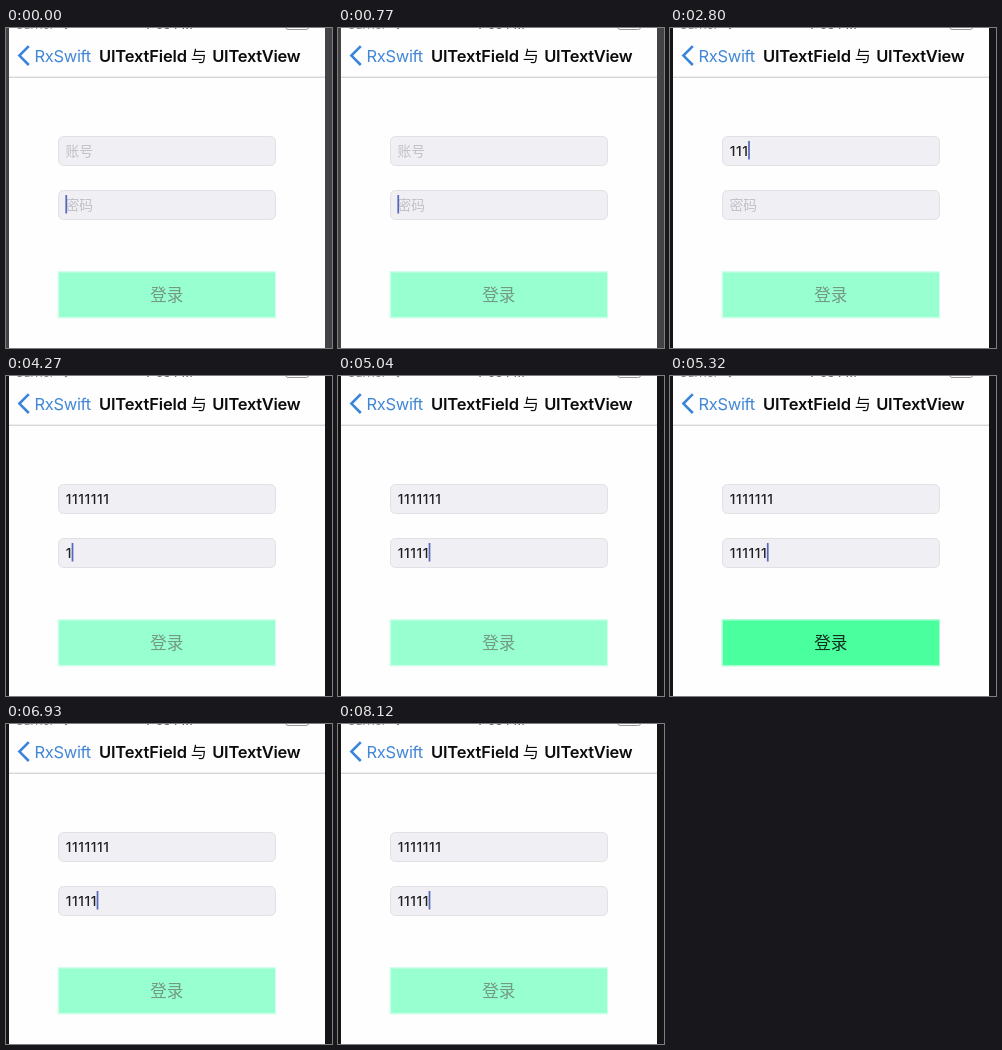
These frames come from a looping animation (326x320 px, 8470 ms). An HTML page with a canvas:

```html
<!DOCTYPE html>
<html lang="zh">
<head>
<meta charset="utf-8">
<title>登录</title>
<style>
  html, body { margin: 0; width: 100%; height: 100%; overflow: hidden; background: #fff; }
  canvas { display: block; width: 326px; height: 320px; }
</style>
</head>
<body>
<canvas id="stage" width="326" height="320"></canvas>
<script>
const ctx = document.getElementById('stage').getContext('2d');
const LOOP = 8470, TICK = 70;
const FONT = 'Inter, "Noto Sans CJK SC", "Noto Sans CJK", sans-serif';
const DIGIT = 6.25, TEXT_X = 59.4;

const userKeys = [2380, 2590, 2800, 3080, 3290, 3500, 3780];
const passKeys = [4270, 4480, 4690, 4830, 5040, 5320, 5740];
const passDeletes = [6650, 6930];

// [time, caret opacity]
const blink = [
  [0, 1], [280, 0], [630, 0], [770, 1], [1120, 1], [1470, 0],
  [2030, 0], [2240, 1], [6230, 1], [6580, 0], [6650, 1],
  [7350, 1], [7700, 0], [7980, 0], [8120, 1], [LOOP, 1]
];

const countBefore = (times, t) => times.filter(k => k <= t).length;

function caretAlpha(t) {
  const i = blink.findIndex(k => k[0] > t);
  const [t0, a0] = blink[i - 1], [t1, a1] = blink[i];
  return a0 + (a1 - a0) * (t - t0) / (t1 - t0);
}

function rect(x, y, w, h, color, alpha = 1) {
  ctx.globalAlpha = alpha;
  ctx.fillStyle = color;
  ctx.fillRect(x, y, w, h);
  ctx.globalAlpha = 1;
}

function text(str, x, y, size, color, weight = 400, spacing = 0) {
  ctx.font = `${weight} ${size}px ${FONT}`;
  ctx.letterSpacing = spacing + 'px';
  ctx.fillStyle = color;
  ctx.fillText(str, x, y);
}

function drawStatusBar() {
  text('Carrier', 9, 0.8, 12, '#777');
  text('7:53 PM', 140, 0.8, 12, '#666', 500);
  ctx.fillStyle = '#888';
  ctx.beginPath();
  ctx.arc(60, 0, 1.3, 0, 7);
  ctx.fill();
  ctx.strokeStyle = '#999';
  ctx.lineWidth = 1;
  ctx.beginPath();
  ctx.roundRect(280, -8, 22.5, 9.5, 2);
  ctx.stroke();
}

function drawNavBar() {
  rect(0, 48.7, 326, 1, '#c8c8ca');
  drawStatusBar();
  ctx.strokeStyle = '#3a84da';
  ctx.lineWidth = 2.6;
  ctx.beginPath();
  ctx.moveTo(22.8, 18.2);
  ctx.lineTo(13.4, 27.6);
  ctx.lineTo(22.8, 37);
  ctx.stroke();
  text('RxSwift', 28.4, 33.5, 16.5, '#4287d6', 400, -0.3);
  text('UITextField', 92.9, 33.5, 16.5, '#0c0c0c', 600, -0.15);
  text('与', 184.8, 33.7, 16, '#0c0c0c', 500);
  text('UITextView', 206.2, 33.5, 16.5, '#0c0c0c', 600, -0.25);
}

function drawField(y, count, hint, focused, alpha) {
  ctx.beginPath();
  ctx.roundRect(52.5, y + 0.5, 217, 29, 5);
  ctx.fillStyle = '#f0eff4';
  ctx.fill();
  ctx.strokeStyle = '#e1e0e5';
  ctx.lineWidth = 1;
  ctx.stroke();
  if (!count) text(hint, TEXT_X, y + 19.8, 13.8, '#c2c1c7');
  for (let i = 0; i < count; i++) {
    text('1', TEXT_X + 0.3 + i * DIGIT, y + 19.8, 13.6, '#202022', 500);
  }
  if (focused) {
    rect(TEXT_X + count * DIGIT, y + 5, 1.7, 18.5, '#5468bc', alpha);
  }
}

function drawButton(enabled) {
  const color = enabled ? '#4aff9d' : '#98ffd0';
  rect(51.5, 243, 218.5, 47.5, color, 0.45);
  rect(53, 244.5, 216, 44.5, color);
  text('登录', 144.2, 273.3, 16.6, enabled ? '#123020' : '#739a86');
}

function draw(t) {
  const user = countBefore(userKeys, t);
  const pass = countBefore(passKeys, t) - countBefore(passDeletes, t);
  const onUser = t >= 2030 && t < passKeys[0];
  const alpha = caretAlpha(t);
  rect(0, 0, 326, 320, '#fefefe');
  drawNavBar();
  drawField(108, user, '账号', onUser, alpha);
  drawField(162, pass, '密码', !onUser, alpha);
  drawButton(pass >= 6);
  const edge = t < 1330 ? '#434345' : '#151517';
  rect(0, 0, 3, 320, edge);
  rect(319, 0, 7, 320, edge);
}

const start = performance.now();
function frame() {
  const t = Math.max(0, performance.now() - start) % LOOP;
  draw(Math.floor(t / TICK) * TICK);
  requestAnimationFrame(frame);
}
frame();
</script>
</body>
</html>
```
